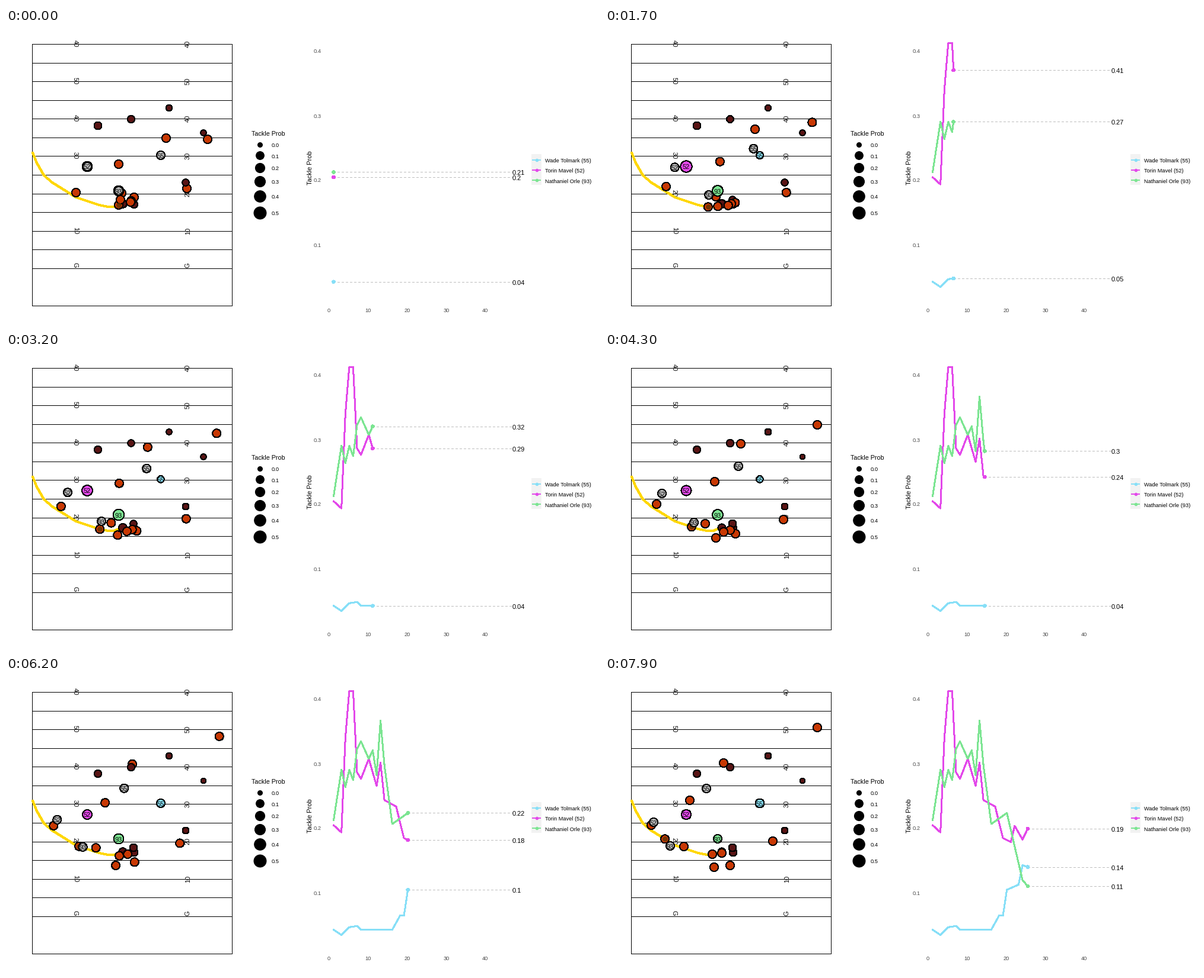
A matplotlib script that plays this animation: 1000x500 px, repeating every 8000 ms.

```python
import numpy as np
import matplotlib.pyplot as plt
from matplotlib.animation import FuncAnimation
from matplotlib.patches import Rectangle

FRAMES, STEP = 80, 100
PX = 0.72  # points per pixel at 100 dpi
ORANGE, MAROON, GREY, BALL = "#C83803", "#5A1414", "#B8B8B8", "#643403"
CYAN, PINK, GREEN = "#87DFF7", "#E348EA", "#7CE592"

plt.rcParams["font.family"] = "Liberation Sans"
fig = plt.figure(figsize=(10, 5), dpi=100, facecolor="white")
ax = fig.add_axes([0, 0, 1, 1])
ax.set_xlim(0, 1000)
ax.set_ylim(500, 0)
ax.axis("off")


def text(x, y, s, size=11, ha="center", rot=0, color="black", z=5):
    return ax.text(x, y, s, fontsize=size * PX, ha=ha, rotation=rot, color=color,
                   va="center_baseline", rotation_mode="anchor", zorder=z)


def line(x, y, color="black", width=1.0, z=1, **kw):
    return ax.plot(x, y, color=color, lw=width * PX, zorder=z,
                   antialiased=False, **kw)[0]


def area(d):
    """Marker area for an outer diameter in pixels, outline included."""
    return ((np.asarray(d, float) - 1) * PX) ** 2


def dots(xy, d, color, z, edge="black"):
    xy = np.atleast_2d(xy)
    return ax.scatter(xy[:, 0], xy[:, 1], s=area(np.broadcast_to(d, len(xy))),
                      c=color, edgecolors=edge, linewidths=PX, zorder=z,
                      antialiased=False)


def diameter(p):
    return 9 + 13 * np.sqrt(np.asarray(p) / 0.5)


# Field: a line every five yards, a number every ten
for k in range(15):
    if k != 1:
        y = np.floor(469.5 - k * 442 / 14)
        line([44, 381], [y, y])
for x in (44, 381):
    line([x, x], [27, 469])
for i, mark in enumerate(["40", "50", "40", "30", "20", "10", "G"]):
    y = 26 + 63.2 * i - (5 if mark == "G" else 0)
    text(118, y, mark, rot=270, z=1.5)
    text(306, y + 0.5, mark, rot=90, z=1.5)

route = np.array([(45, 211), (52, 228), (64, 249), (78, 261), (118, 286),
                  (157, 299), (175, 302.5), (184, 301.5), (192, 298)])
line(*route.T, "#FFD700", 3, 1.8)

# Size legend
text(414, 178.5, "Tackle Prob", 10.7, "left")
for i in range(6):
    y = 197 + 17 * i + 1.2 * i ** 2
    dots((428, y), diameter(i / 10), "black", 3)
    text(448, y + 0.8, f"{i / 10:.1f}", 9.3, "left")


# Chart
def chart_x(n):
    return 545.9 + 6.59 * np.asarray(n)


def chart_y(p):
    return 38.5 + 1090 * (0.4 - np.asarray(p))


for i in range(5):
    text(544.7 + 65.9 * i, 476, str(10 * i), 9.3, color="#4D4D4D")
for i in range(1, 5):
    text(532, chart_y(i / 10) + 0.5, f"{i / 10:.1f}", 9.3, "right", color="#4D4D4D")
text(511.5, 236, "Tackle Prob", rot=90)

steps = np.arange(1, 27)
knots = np.ceil(3.25 * (steps - 1) - 0.5)


def series(*turns):
    """Straight runs between turning points (step, probability)."""
    return np.interp(steps, *zip(*turns))


probs = np.array([
    series((1, .042), (3, .034), (5, .046), (7, .048), (8, .042), (16, .042),
           (18, .064), (19, .064), (20, .104), (23, .112), (24, .142), (26, .138)),
    series((1, .204), (3, .193), (4, .339), (5, .412), (6, .412), (7, .286),
           (8, .276), (10, .307), (12, .265), (13, .301), (14, .243), (17, .233),
           (19, .184), (21, .178), (22, .203), (24, .182), (26, .207)),
    series((1, .212), (3, .29), (4, .263), (5, .29), (6, .274), (7, .322),
           (8, .334), (10, .307), (11, .32), (12, .282), (13, .366), (14, .297),
           (16, .206), (20, .223), (24, .119), (26, .105)),
])

colors = [CYAN, PINK, GREEN]
numbers = ["55", "52", "93"]
names = ["Wade Tolmark", "Torin Mavel", "Nathaniel Orle"]
ax.add_patch(Rectangle((886, 212.5), 17, 52.5, color="#F2F2F2", lw=0, zorder=1))
for i in range(3):
    y = 223 + 17.2 * i
    line([888, 901], [y, y], colors[i], 2, 2)
    dots((894.5, y), 5.5, colors[i], 3, colors[i])
    text(909, y + 0.8, f"{names[i]} ({numbers[i]})", 9.3, "left")

dashes = [line([], [], "#BEBEBE", 1, 2, ls=(0, (4, 4))) for _ in range(3)]
curves = [line([], [], c, 2, 3, solid_joinstyle="round") for c in colors]
tips = dots([(0, 0)] * 3, 5.5, colors, 4, colors)
values = [text(853.5, 0, "", 11, "left") for _ in range(3)]


# Players run on parabolas through a start, a middle and an end point
def runs(*paths):
    pts = np.array(paths, float).transpose(1, 0, 2).reshape(3, -1)
    coef = np.polyfit([0, 43 / 79, 1], pts, 2)
    return lambda t: (np.array([t * t, t, 1]) @ coef).reshape(-1, 2)


offence = runs(
    [(270, 186), (229, 155), (200, 147)],
    [(305, 271), (301, 283), (283, 279)],
    [(118, 278), (87, 257), (78, 252)],
    [(190, 230), (185, 219), (143, 210)],
    [(340, 188), (358, 123), (358, 87)],
    [(195, 279), (169, 290), (133, 288)],
    [(216, 286), (220, 307), (211, 320)],
    [(211, 292), (211, 301), (197, 299)],
    [(210, 294), (200, 304), (181, 301)],
    [(190, 298), (146, 296), (101, 278)],  # carrier, kept on the route
    [(193, 290), (187, 314), (184, 323)],
)
CARRIER = 9
chasers = runs(
    [(261, 215), (225, 193), (171, 190)],
    [(137, 234), (96, 239), (82, 247)],
    [(190, 275), (150, 288), (110, 287)],
)


def runners(t):
    xy = offence(t)
    xy[CARRIER, 1] = np.interp(xy[CARRIER, 0], *route.T)
    return xy


# Other defenders stay in place (x, y, mean diameter) and pulse slightly
low = np.array([(275, 135, 11.4), (155, 165, 13.5), (333, 177, 10),
                (197, 297, 14.5), (216, 298, 13.5), (215, 290, 13)])
high = np.array([(211, 154, 13), (303, 261, 12.2)])
starts = chasers(0.0)

low_dots = dots(low[:, :2], low[:, 2], MAROON, 3)
attack = dots(runners(0.0), 15, ORANGE, 3.2)
high_dots = dots(high[:, :2], high[:, 2], MAROON, 3.4)
ball = dots((0, 0), 8.5, BALL, 3.5, BALL)
ball.set_alpha(0.85)
posts = dots(starts, 15, colors, 3.6)
for (x, y), num in zip(starts, numbers):
    text(x, y + 0.5, num, z=3.7)
movers = dots(starts, 15, GREY, 3.8)
tags = [text(0, 0, num, z=3.9) for num in numbers]


def pulse(group, k):
    return area(group[:, 2] + 0.6 * np.sin(0.35 * k + np.arange(len(group))))


def update(k):
    n = np.interp(k, knots, steps)
    now = np.array([np.interp(n, steps, p) for p in probs])
    done = steps < n
    near = int(n + 0.5) - 1
    x, ys = chart_x(n), chart_y(now)
    for i in range(3):
        curves[i].set_data(np.append(chart_x(steps[done]), x),
                           np.append(chart_y(probs[i][done]), ys[i]))
        dashes[i].set_data([x, 855], [ys[i], ys[i]])
        values[i].set_y(ys[i] + 1)
        values[i].set_text(f"{round(probs[i][near], 2):g}")
    tips.set_offsets(np.column_stack([np.full(3, x), ys]))

    t = k / (FRAMES - 1)
    xy = runners(t)
    attack.set_offsets(xy)
    ball.set_offsets(xy[CARRIER])
    spots = chasers(t)
    movers.set_offsets(spots)
    for tag, (px, py) in zip(tags, spots):
        tag.set_position((px, py + 0.5))
    low_dots.set_sizes(pulse(low, k))
    high_dots.set_sizes(pulse(high, k))
    posts.set_sizes(area(diameter(now)))
    return []


anim = FuncAnimation(fig, update, frames=FRAMES, interval=STEP, repeat=True,
                     repeat_delay=0)
plt.show()
```
